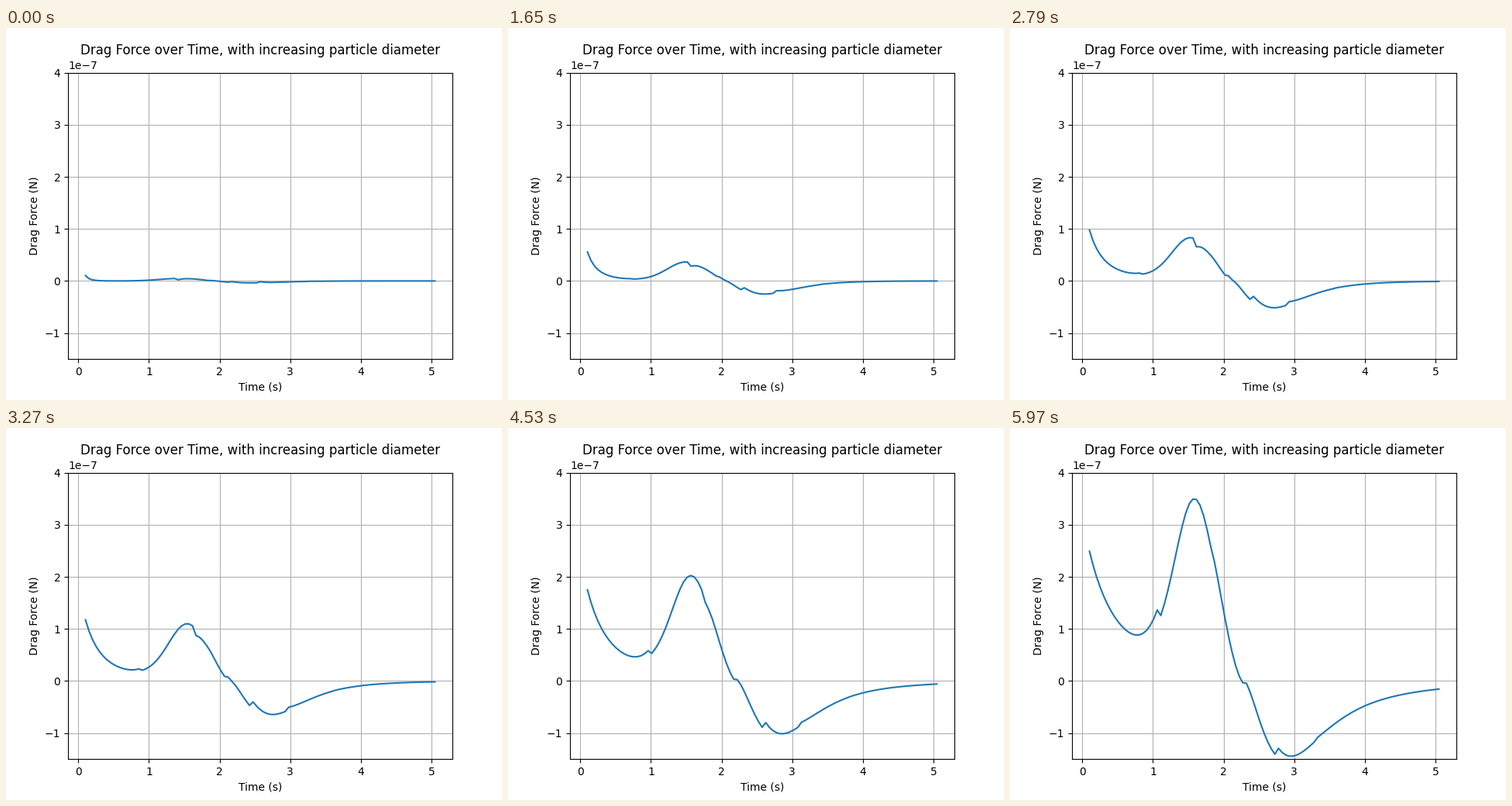
Animation, 640 px wide and 480 px high, one loop 6000 ms. Source, as a matplotlib script:

```python
import numpy as np
import matplotlib.pyplot as plt
from matplotlib.animation import FuncAnimation

FRAMES = 200
STEPS = 99
STEP = 5 / STEPS      # seconds per plotted step
SUB = 40              # integration substeps per plotted step

# Speeds, distances and times below are counted in plotted steps.
BASE, SURGE = 3.46, 6.5   # steady flow speed and height of the pulse
PEAK = 33.8               # moment of the pulse at the first station
SPACING = 67.3            # distance between flow stations
DELAY = 0.95              # pulse delay from one station to the next


def pulse(t):
    """Flow pulse that rises steeply and dies away with a longer tail."""
    z = np.abs(t - PEAK)
    return np.where(t < PEAK,
                    0.5 ** ((z / 9.6) ** 2.23),
                    0.5 ** ((z / 10.5) ** 1.75))


def drag(slip, size):
    """Schiller-Naumann drag in nN for a particle of relative size."""
    correction = 1 + 1.03 * (size * np.abs(slip)) ** 0.687
    return 23.7 * size * slip * correction


def simulate(size):
    """Release particles at rest in the flow and record their drag."""
    mass = 1000 * size ** 3
    pos = np.zeros_like(size)
    vel = np.zeros_like(size)
    history = []
    for i in range(STEPS * SUB + 1):
        # The flow is taken from the nearest station, hence the jumps.
        station = np.round(pos / SPACING)
        flow = BASE + SURGE * pulse(i / SUB - DELAY * station)
        force = drag(flow - vel, size)
        if i and i % SUB == 0:
            history.append(force)
        vel = vel + force / mass / SUB
        pos = pos + vel / SUB
    return np.array(history).T * 1e-9


sizes = np.linspace(0.21, 1, FRAMES)
forces = simulate(sizes)
t = STEP * np.arange(2, STEPS + 2)

fig, ax = plt.subplots(figsize=(6.4, 4.8), dpi=100)
line, = ax.plot(t, forces[0])
ax.set_ylim(-1.5e-7, 4e-7)
ax.set_title("Drag Force over Time, with increasing particle diameter")
ax.set_xlabel("Time (s)")
ax.set_ylabel("Drag Force (N)")
ax.grid()


def update(n):
    line.set_ydata(forces[n])
    return line,


anim = FuncAnimation(fig, update, frames=FRAMES, interval=30,
                     repeat=True, repeat_delay=0)
plt.show()
```
